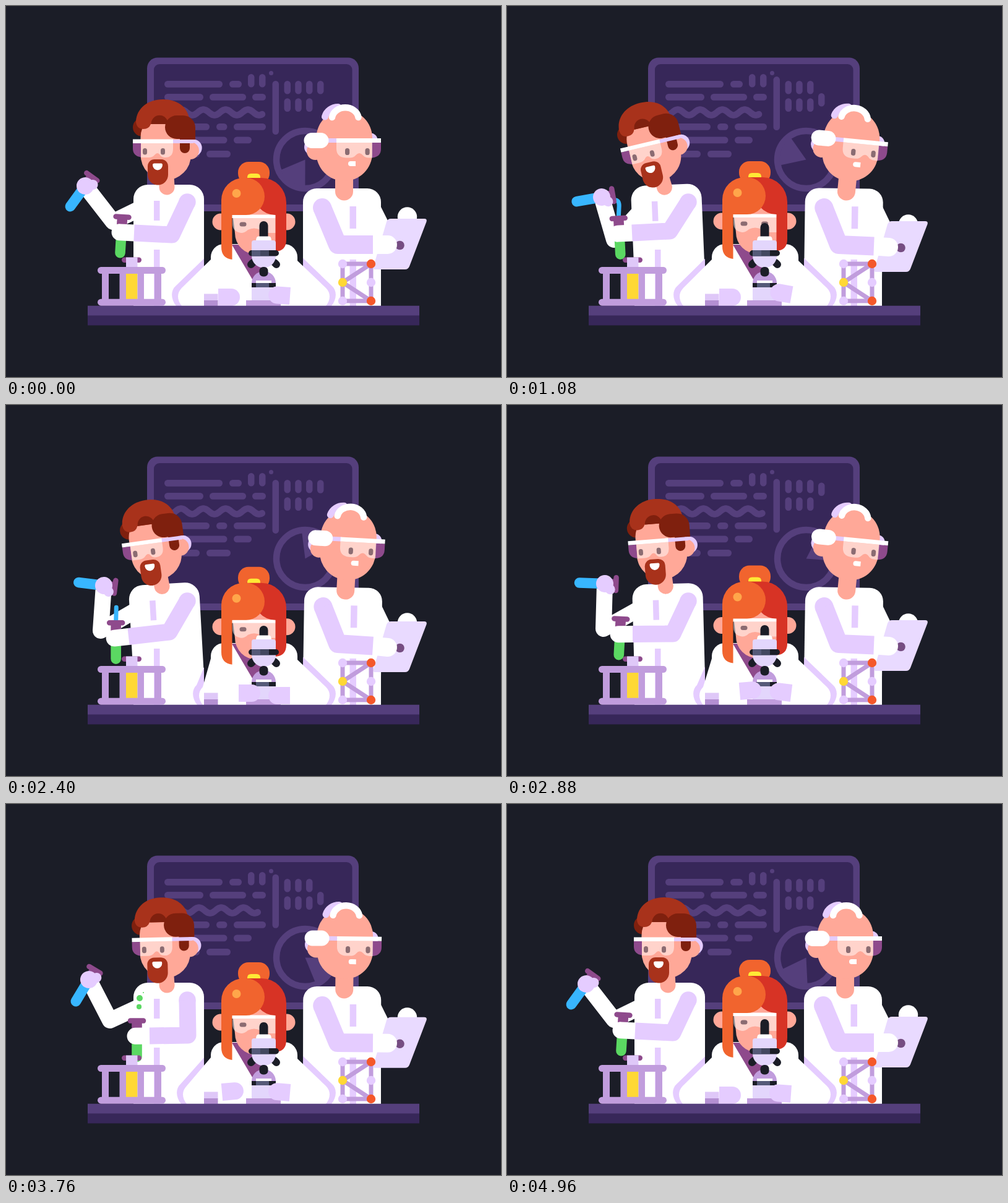
An HTML page that plays this animation: 800 by 600 pixels, repeating every 5000 ms.

```html
<!DOCTYPE html>
<html lang="en">
<head>
<meta charset="utf-8">
<title>Laboratory</title>
<style>
  html, body { margin: 0; width: 100%; height: 100%; overflow: hidden; background: #1b1d27; }
  svg { display: block; width: 100vw; height: 100vh; }
  .line { fill: none; stroke-linejoin: round; }
  .round { stroke-linecap: round; }
  .lilac { fill: #e5ccff; } .s-lilac { stroke: #e5ccff; }
  .white { fill: #fff; } .s-white { stroke: #fff; }
  .skin { fill: #ffa898; }
  .plum { fill: #8e4a8c; }
  .violet { fill: #553f7c; } .s-violet { stroke: #553f7c; }
  .deep { fill: #372759; }
  .mauve { fill: #c19ddd; } .s-mauve { stroke: #c19ddd; }
  .rust { fill: #a8321b; } .brown { fill: #7f200e; }
  .orange { fill: #f1642e; } .red { fill: #d73325; }
  .pale { fill: #e3d6fc; } .ink { fill: #1b1d27; } .slate { fill: #555a78; }
  .yellow { fill: #ffd835; } .coral { fill: #f4582a; }
  .green { fill: #5bd862; } .blue { fill: #38b6ff; }
  .lens { fill: #fff; opacity: .5; } .eye { fill: #8b6c72; }
</style>
</head>
<body>
<svg viewBox="0 0 800 600">
  <defs>
    <clipPath id="leftCoat"><rect x="200" y="380" width="120" height="110"/></clipPath>
    <clipPath id="rightCoat"><rect x="480" y="380" width="126" height="110"/></clipPath>
  </defs>
  <rect class="ink" width="800" height="600"/>

  <g id="board">
    <rect class="violet" x="228" y="83.5" width="342" height="248.5" rx="17"/>
    <rect class="deep" x="239" y="94" width="320.5" height="227" rx="9"/>
    <g id="notes" class="violet"><circle cx="428.5" cy="108.5" r="3.5"/></g>
    <path id="wave" class="line round s-violet" stroke-width="10.5"/>
    <rect id="bar" class="violet" x="430.5" y="121" width="10.5" height="87" rx="5.2"/>
    <rect id="pill" class="violet" x="503" y="121" width="10.5" height="21.5" rx="5.2"/>
    <circle class="line s-violet" cx="483.5" cy="248.5" r="46.5" stroke-width="10.5"/>
    <path id="slice" class="violet" d="M483.5 248.5V291.5A43 43 0 0 1 443.9 265.3z"/>
  </g>

  <g id="chemist">
    <path id="backArm" class="line s-white" stroke-width="26"/>
    <path class="white" d="M206 425H320V485H206z"/>
    <g id="lBody">
      <path class="white" d="M206 440V312a23 23 0 0 1 23-23H297a23 23 0 0 1 23 23V440z"/>
      <path class="lilac" d="M239 315h9.5v32h-9.5z"/>
      <g id="lHead">
        <path class="skin" d="M247 265h24l1.500 28a12.500 12.500 0 0 1-25 0z"/>
        <circle class="brown" cx="220" cy="196" r="15"/>
        <circle class="lilac" cx="303" cy="229.500" r="13.700"/>
        <circle class="skin" cx="298" cy="234" r="14"/>
        <rect class="skin" x="217.500" y="172" width="81.500" height="109.500" rx="40.700"/>
        <path class="rust" d="M210 187C211 165 230 151 253 151C276 151 292 162 296 181L270 191H234Q231 199 222 199Q211 199 210 187z"/>
        <path class="brown" d="M234.500 191A13.500 14 0 0 1 262 191z"/>
        <path class="brown" d="M276 177H286a20 20 0 0 1 20 20V216H297V230a8 8 0 0 1-16 0V215H276a19 19 0 0 1 0-38z"/>
        <path class="plum" d="M205 222h13v22.500q-13-2-13-14z"/>
        <path class="lens" d="M218 222H270V231q0 14-13 14q-6 0-8-4q-4-6-9 0q-3 4-10 4h-12z"/>
        <rect class="eye" x="221" y="230" width="7" height="10.500" rx="3.500"/>
        <rect class="eye" x="250" y="230" width="7" height="10.500" rx="3.500"/>
        <path class="lilac" d="M268 216H303v6H268z"/>
        <path class="white" d="M205 215.500H270V222H205z"/>
        <path class="rust" d="M240 248H251a11 11 0 0 1 11 11V273a16.500 16.500 0 0 1-33 0V259a11 11 0 0 1 11-11z"/>
        <path class="white" d="M239.500 254.500H251q2 0 2 2.500a8 8.500 0 0 1-16 0q0-2.500 2.500-2.500z"/>
      </g>
    </g>
    <path class="lilac" d="M239 394h9.500v91h-9.500z"/>
    <g id="bubbles" class="green"></g>
    <path id="stream" class="line round" stroke="#38b6ff" stroke-width="7" pathLength="1"/>
    <g id="greenTube">
      <path class="green" d="M-8.300 0H8.300V33.500a8.300 8.300 0 0 1-16.600 0z"/>
      <rect class="plum" x="-8.300" y="-25" width="16.600" height="26"/>
      <rect class="plum" x="-14.700" y="-29" width="29.400" height="8.500" rx="4.200"/>
    </g>
    <path id="lHand" class="line round s-white" stroke-width="27"/>
    <circle class="lilac" cx="293" cy="317" r="13.700"/>
    <path id="lArm" class="line s-lilac" stroke-width="27"/>
    <g id="blueTube">
      <path class="blue" d="M0-8.300V8.300H-41a8.300 8.300 0 0 1 0-16.600z"/>
      <rect class="plum" y="-8" width="18" height="16"/>
      <rect class="plum" x="14" y="-14.700" width="8.500" height="29.400" rx="4.200"/>
      <circle class="lilac" r="14"/>
      <circle class="lilac" cx="9" cy="9" r="8"/>
    </g>
  </g>

  <g id="elder">
    <path class="white" d="M480 425H606V485H480z"/>
    <g id="rBody">
      <path class="white" d="M480 440V317a22 22 0 0 1 22-22H584a22 22 0 0 1 22 22V440z"/>
      <path class="white" d="M594 303L606 325L626 365L596 385z"/>
      <path class="lilac" d="M555.500 324h10.500v36h-10.500z"/>
      <g id="rHead">
        <path class="skin" d="M532 265h29v35a14.500 14.500 0 0 1-29 0z"/>
        <circle class="lilac" cx="495.500" cy="228" r="13.500"/>
        <circle class="lilac" cx="589" cy="217" r="11.500"/>
        <circle class="skin" cx="500" cy="235" r="14"/>
        <rect class="skin" x="501.500" y="168" width="90.500" height="115" rx="45.200"/>
        <path class="line round s-lilac" d="M515.500 179A22 21 0 0 1 537 163.500" stroke-width="11"/>
        <path class="line round s-white" d="M527 180A21.500 18.500 0 0 1 569.500 180" stroke-width="10.500"/>
        <path class="plum" d="M591.500 221H606V231q0 13-14.500 14.500z"/>
        <path class="lens" d="M534 221H592V245.500h-5q-7 0-10-4q-6-7-12 0q-3 4-10 4h-6q-15-1-15-15z"/>
        <rect class="eye" x="548" y="230" width="7.200" height="11" rx="3.600"/>
        <rect class="eye" x="580.500" y="230" width="7.200" height="11" rx="3.600"/>
        <path class="lilac" d="M519 214H535v7H519z"/>
        <path class="white" d="M534 214H606V221H534z"/>
        <rect class="white" x="481.500" y="205" width="40" height="25" rx="12.500"/>
        <path class="white" d="M557 251H565V259H557q-4 0-4-4t4-4z"/>
      </g>
    </g>
    <path class="lilac" d="M555.500 410h10.500v75h-10.500z"/>
    <circle id="topHand" class="white" cx="648.500" cy="341" r="15.700"/>
    <g id="clipboard">
      <path d="M622 344H676q5 0 3.500 5L652 421q-2 5-7 5H597q-5 0-3-5L615 349q2-5 7-5z" fill="#e9daff"/>
      <circle cx="636.500" cy="387" r="7.300" fill="#764d82"/>
    </g>
    <path id="rHand" class="line round s-white" stroke-width="30"/>
    <circle id="rShoulder" class="lilac" cy="326" r="15"/>
    <path id="rArm" class="line s-lilac" stroke-width="30"/>
  </g>

  <g id="researcher">
    <path id="lShade" class="lilac" clip-path="url(#leftCoat)"/>
    <path class="lilac" clip-path="url(#rightCoat)" d="M470 398L527 453C535 460 535 474 526 485H470z"/>
    <path id="lSleeve" class="white"/>
    <path id="lFore" class="line s-white" stroke-width="29"/>
    <path class="white" d="M470 411L517 456C525 464 525 475 517 485H450V411z"/>
    <path class="white" d="M331 485V406a21 21 0 0 1 21-21H450a21 21 0 0 1 21 21V485z"/>
    <path class="plum" d="M365 386H436L401 447z"/>
    <g id="wHead">
      <circle class="skin" cx="347" cy="349" r="13.500"/>
      <circle class="skin" cx="454" cy="349" r="13.500"/>
      <path class="skin" d="M362 300H440V367a35 35 0 0 1-70 0z"/>
      <path class="lens" d="M366 343H436V367H424q-8 0-13-5q-10-5-20 0q-5 5-11 5q-14-2-14-15z"/>
      <rect class="eye" x="377.500" y="349.500" width="11" height="7" rx="3.500"/>
      <rect class="eye" x="411" y="349.500" width="11" height="7" rx="3.500"/>
      <path class="white" d="M364 337.500H438V343H364z"/>
      <rect class="orange" x="375" y="252" width="51" height="36" rx="17"/>
      <path d="M390 279v-2q0-6 6-6h9q6 0 6 6v2z" fill="#ffe935"/>
      <path class="red" d="M388 278H413a40 40 0 0 1 40 40V378q0 18-17.500 19V338Q420 338 409 326z"/>
      <path class="orange" d="M384 278H388a30 30 0 0 1 0 60H365.500V410Q348 408 348 390V314a36 36 0 0 1 36-36z"/>
      <circle cx="372.500" cy="303" r="7" fill="#ffa64a"/>
    </g>
    <g id="scope">
      <rect id="eyepiece" class="ink" x="409.500" y="348" width="14" height="36" rx="7"/>
      <path class="white" d="M408 372.500H425q4 0 4 8H404q0-8 4-8z"/>
      <g class="line round" stroke="#1b1d27" stroke-width="12">
        <path d="M399 415L396 418M434 415L437 418"/>
      </g>
      <path class="pale" d="M401 379H432q4 0 4 4V404a19.500 19.500 0 0 1-39 0V383q0-4 4-4z"/>
      <rect class="ink" x="392" y="395" width="49" height="9.500" rx="4.700"/>
      <path class="slate" d="M397 395h14v9.500h-14z"/>
      <path class="slate" opacity=".7" d="M411 395h14v9.500h-14z"/>
      <path class="mauve" d="M397 448a19.500 19 0 0 1 39 0z"/>
      <rect class="ink" x="409.500" y="422" width="14" height="15.500" rx="6"/>
      <path class="white" d="M404 444h25v4h-25z"/>
      <path class="ink" d="M397 448h39v7h-39z"/>
      <path class="slate" d="M404 448h21v7h-21z"/>
      <path class="pale" d="M397 455h39v21h-39z"/>
      <path class="mauve" d="M388 476h56v9h-56z"/>
    </g>
    <path d="M320 465.500h22.500v11h-22.500z" fill="#dfc8f8"/>
    <path d="M320 476h22.500v9h-22.500z" fill="#b490d2"/>
    <path id="wLeft" class="lilac" d="M0-14H21a14 14 0 0 1 0 28H0z"/>
    <path id="wRight" class="lilac" d="M0-14H-21a14 14 0 0 0 0 28H0z"/>
  </g>

  <path class="violet" d="M132 484.800H668V501H132z"/>
  <path class="deep" d="M132 500.500H668V516.500H132z"/>

  <g id="rack">
    <rect class="plum" x="187" y="406.500" width="32" height="8.500" rx="4.200"/>
    <path d="M194 406.500h18.500v17h-18.500z" fill="#dfc8f8"/>
    <path class="yellow" d="M194 432h18.500v42h-18.500z"/>
    <path class="mauve" d="M155 430h11v46h-11zM183.500 430h10.500v46h-10.500zM212.500 430h10.500v46h-10.500zM240 430h11v46h-11z"/>
    <rect class="mauve" x="148" y="422" width="110" height="11" rx="5.500"/>
    <rect class="mauve" x="148" y="473.700" width="110" height="11" rx="5.500"/>
  </g>
  <g id="molecule">
    <path class="line s-mauve" stroke-width="7" d="M544 417H590V477H544zM590 417L544 447L590 477"/>
    <circle class="lilac" cx="544" cy="417" r="7.200"/>
    <circle class="coral" cx="590" cy="417" r="7.200"/>
    <circle class="yellow" cx="544" cy="447" r="7.200"/>
    <circle class="lilac" cx="590" cy="447" r="7.200"/>
    <circle class="lilac" cx="544" cy="477" r="7.200"/>
    <circle class="coral" cx="590" cy="477" r="7.200"/>
  </g>
</svg>
<script>
const LOOP = 5000;
const TIMES = [0, 1080, 1680, 2400, 2880, 3760, 4960];

// Each row holds one value per time; the first value closes the loop.
const TRACKS = {
  lean:  [0, -2.4, -3.3, -3.2, -1.5, 0],
  nod:   [0, -11, -8, -4.7, -3, -1.2],
  elbX:  [268, 263, 265, 264, 268, 294],
  elbY:  [370, 364, 366, 367, 370, 374],
  wriX:  [207, 202, 198, 198, 203, 232],
  wriY:  [367, 367, 371.5, 374.5, 370.5, 375],
  tubeR: [3.5, -3, 0, 0, 3, 0],
  backX: [173, 173, 163, 153, 156, 168],
  backY: [349, 378, 378, 365, 362, 350],
  pourX: [128, 153, 155, 158, 158, 134],
  pourY: [291, 309, 306, 292, 289, 284],
  pourR: [-54, -10, -3, 7, 2, -59],
  sway:  [0, .8, 1, .9, .9, .1],
  turn:  [0, 4.7, 0, 2.2, 4.7, .5],
  clip:  [0, 4, 3.7, 6, 4, .8],
  top:   [0, 12, 8.5, 11, 12, 4],
  bob:   [0, -1, -5.6, 9.7, 7.5, 4],
  focus: [0, 3, 7, 9, 8, 5],
  reach: [0, 1, 2, 34, 33, 8],
  leftX: [343, 343, 344, 376, 376, 349],
  leftY: [471, 471, 471, 466, 463, 466],
  leftR: [0, 0, 0, 0, -5, -5],
  rightX: [459, 460, 461, 459, 459.5, 459],
  rightY: [469, 467, 464, 470, 466, 467],
  rightR: [4, 10, 13, 0, 7, 5]
};
const BUBBLES = [[2960, 222, 3], [3140, 216, 6], [3420, 215, 4.4], [3780, 212, 5]];

const $ = id => document.getElementById(id);
const set = (id, name, value) => $(id).setAttribute(name, value);
const move = (id, x, y, r = 0) => set(id, 'transform', `translate(${x} ${y}) rotate(${r})`);
const turn = (id, r, x, y) => set(id, 'transform', `rotate(${r} ${x} ${y})`);
const clamp = v => Math.min(1, Math.max(0, v));
const make = (parent, tag, attrs) => {
  const el = document.createElementNS('http://www.w3.org/2000/svg', tag);
  for (const k in attrs) el.setAttribute(k, attrs[k]);
  return $(parent).appendChild(el);
};

function bar(x1, y1, x2, y2) {
  make('notes', 'rect', { x: x1, y: y1, width: x2 - x1, height: y2 - y1, rx: 5.2 });
}
const ROWS = [[121, 256, 350, 361, 381], [142, 256, 319, 329, 388, 398, 420],
  [190, 256, 329, 340, 357.5, 368, 420], [211.5, 256, 357.5, 368, 397], [234, 256, 313, 324, 363]];
for (const [y, ...xs] of ROWS)
  for (let i = 0; i < xs.length; i += 2) bar(xs[i], y, xs[i + 1], y + 10.7);
for (const x of [391, 409]) bar(x, 110, x + 10.5, 131.5);
for (const x of [449.5, 467.2, 485]) {
  bar(x, 121, x + 10.5, 142.5);
  bar(x, 149.3, x + 10.5, 171);
}
let wave = '';
for (let x = 268; x <= 414; x += 2)
  wave += `${wave ? 'L' : 'M'}${x} ${(172 - 4.6 * Math.cos((x - 283) * Math.PI / 18)).toFixed(1)}`;
set('wave', 'd', wave);
const drops = BUBBLES.map(() => make('bubbles', 'circle', {}));

// Smooth curve through the poses that never overshoots.
function sample(row, t) {
  const v = [...row, row[0]];
  const last = v.length - 1;
  if (t >= TIMES[last]) return v[0];
  let i = 0;
  while (t >= TIMES[i + 1]) i++;
  const grade = k => (v[k + 1] - v[k]) / (TIMES[k + 1] - TIMES[k]);
  const slope = k => {
    if (k === 0 || k === last) return 0;
    const a = grade(k - 1), b = grade(k);
    return a * b <= 0 ? 0 : 2 * a * b / (a + b);
  };
  const h = TIMES[i + 1] - TIMES[i], u = (t - TIMES[i]) / h, w = 1 - u;
  return v[i] * (1 + 2 * u) * w * w + v[i + 1] * u * u * (3 - 2 * u)
    + h * u * w * (slope(i) * w - slope(i + 1) * u);
}

function drawBoard(t) {
  const s = (1 - Math.cos(t / LOOP * 4 * Math.PI)) / 2;
  move('wave', -7.2 * s, 0);
  move('bar', 0, -7.2 * s);
  move('pill', 0, 21 * s);
  turn('slice', 360 * t / LOOP, 483.5, 248.5);
}

function drawChemist(p, t) {
  turn('lBody', p.lean, 263, 440);
  turn('lHead', p.nod, 260, 290);
  set('backArm', 'd', `M222 325L${p.backX} ${p.backY}L${p.pourX} ${p.pourY}`);
  move('blueTube', p.pourX, p.pourY, p.pourR);

  const dx = p.wriX - p.elbX, dy = p.wriY - p.elbY, len = Math.hypot(dx, dy);
  const hx = p.wriX + 23 * dx / len, hy = p.wriY + 23 * dy / len;
  set('lArm', 'd', `M293 317L${p.elbX} ${p.elbY}L${p.wriX} ${p.wriY}`);
  set('lHand', 'd', `M${p.wriX} ${p.wriY}L${hx} ${hy}`);
  move('greenTube', hx + 2.5, hy, p.tubeR);

  const a = p.pourR * Math.PI / 180, b = p.tubeR * Math.PI / 180;
  const sx = p.pourX + 18 * Math.cos(a) + 2, sy = p.pourY + 18 * Math.sin(a) + 8;
  const gx = hx + 2.5 + 25 * Math.sin(b), gy = hy - 25 * Math.cos(b);
  const head = clamp((t - 860) / 140), tail = clamp((t - 2320) / 160);
  set('stream', 'd', `M${sx} ${sy}Q${gx + 1} ${sy - 1} ${gx + 1} ${sy + 9}L${gx} ${gy}`);
  set('stream', 'stroke-dasharray', `${head - tail} 9`);
  set('stream', 'stroke-dashoffset', -tail);
  set('stream', 'visibility', head > tail ? 'visible' : 'hidden');

  BUBBLES.forEach(([start, x, size], i) => {
    const u = clamp((t - start) / 900);
    drops[i].setAttribute('cx', x);
    drops[i].setAttribute('cy', 345 - 45 * u);
    drops[i].setAttribute('r', size * Math.sin(Math.PI * u));
  });
}

function drawElder(p) {
  turn('rBody', p.sway, 543, 440);
  turn('rHead', p.turn, 546, 300);
  move('clipboard', 0, p.clip);
  move('topHand', 0, p.top);
  const x = 511 + 1.5 * p.sway, y = 386 + .6 * p.clip;
  set('rShoulder', 'cx', x);
  set('rArm', 'd', `M${x} 326L536 386L593 ${y}`);
  set('rHand', 'd', `M593 ${y}L617 ${386 + p.clip}`);
}

function drawResearcher(p) {
  const s = p.reach;
  move('wHead', 0, p.bob);
  move('eyepiece', 0, p.focus);
  set('lShade', 'd', `M331 398L${274 + s} 453C${266 + s} 460 ${266 + s} 474 ${275 + s} 485H331z`);
  set('lSleeve', 'd', `M331 410L${284 + s} 456C${276 + s} 464 ${276 + s} 475 ${284 + s} 485H345V410z`);
  set('lFore', 'd', `M${300 + s} 470L${p.leftX} ${p.leftY}`);
  move('wLeft', p.leftX, p.leftY, p.leftR);
  move('wRight', p.rightX, p.rightY, p.rightR);
}

function draw(now) {
  const t = now % LOOP, p = {};
  for (const k in TRACKS) p[k] = sample(TRACKS[k], t);
  drawBoard(t);
  drawChemist(p, t);
  drawElder(p);
  drawResearcher(p);
}

const began = performance.now();
function tick() {
  draw(performance.now() - began);
  requestAnimationFrame(tick);
}
tick();
</script>
</body>
</html>
```
